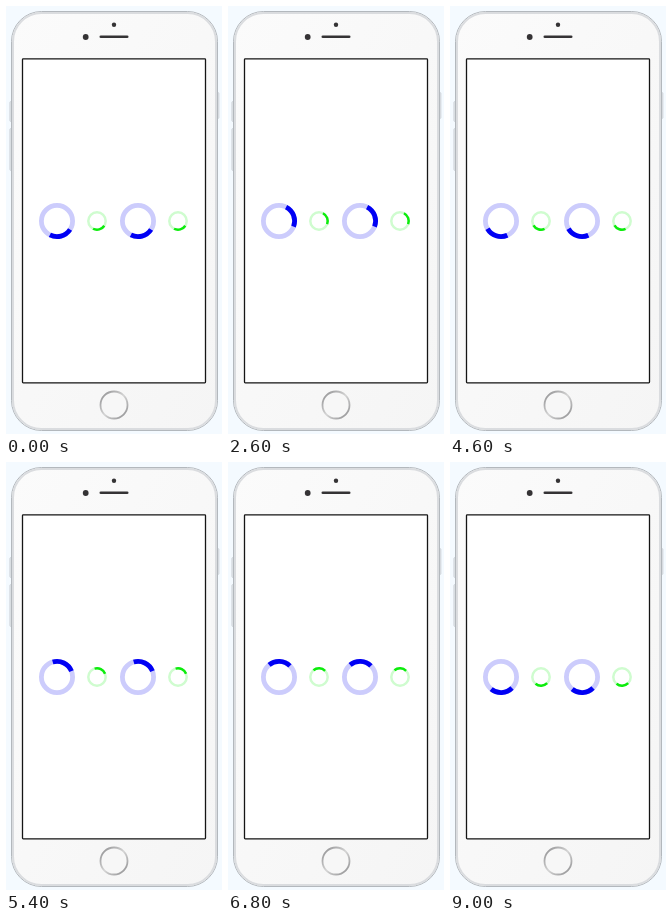
Recreate the animation shown at these times as an HTML page. Size 216 by 428 pixels, loop 9.2 s.

```html
<!DOCTYPE html>
<html lang="en">
<meta charset="utf-8">
<title>Spinners</title>
<style>
  html, body { margin: 0; height: 100%; overflow: hidden; background: #f4faff; }
  svg { display: block; width: 216px; height: 428px; }
</style>
<svg viewBox="0 0 216 428" fill="none">
  <defs>
    <linearGradient id="metal" x2="1" y2="1">
      <stop stop-color="#8c8c8e"/>
      <stop offset=".5" stop-color="#d4d4d4"/>
      <stop offset="1" stop-color="#8c8c8e"/>
    </linearGradient>
    <linearGradient id="body" x2="1" y2="1">
      <stop stop-color="#fbfbfb"/>
      <stop offset="1" stop-color="#f5f5f5"/>
    </linearGradient>
  </defs>

  <!-- phone -->
  <g fill="#dfe3e7" stroke="#bcc3c9" stroke-width=".5">
    <rect x="3.8" y="95.5" width="2.5" height="20" rx="1"/>
    <rect x="3.8" y="122.5" width="2.5" height="42" rx="1"/>
    <rect x="210.5" y="86.5" width="2.5" height="26" rx="1"/>
  </g>
  <rect x="5.5" y="5.5" width="206" height="419" rx="30" fill="url(#body)" stroke="#b3b8bd"/>
  <rect x="7" y="7" width="203" height="416" rx="28.5" stroke="#dadcdf" stroke-width="2"/>
  <g fill="#353335">
    <circle cx="108" cy="18.8" r="2.2"/>
    <circle cx="79.7" cy="31" r="2.9"/>
    <rect x="93.5" y="29.5" width="29" height="2.6" rx="1.3"/>
  </g>
  <rect x="16.5" y="52.8" width="183" height="324" rx=".7" fill="#fff" stroke="#151515" stroke-width="1.3"/>
  <circle cx="108" cy="399" r="13.5" fill="#f7f7f7" stroke="url(#metal)" stroke-width="1.8"/>

  <g id="spinners"></g>
</svg>
<script>
  const STEP = 200, LOOP = 9200;
  const ARC = 84; // degrees
  // [step, angle of the arc's middle in degrees]
  const turns = [[0, 75], [6, 374], [13, 699], [23, 1188], [30, 1517], [38, 1908], [45, 2247]];

  const spinner = (x, r, width, color, track) => `
    <g transform="translate(${x} 215)" stroke-width="${width}">
      <circle r="${r}" stroke="${track}"/>
      <circle class="arc" r="${r}" stroke="${color}" pathLength="360"
        stroke-dasharray="${ARC} ${360 - ARC}" stroke-dashoffset="${ARC / 2}"/>
    </g>`;
  const pair = x =>
    spinner(x, 15.6, 4.8, '#0000f4', '#ccccfc') +
    spinner(x + 40, 8.7, 2.5, '#0cec0c', '#cffccf');

  const group = document.getElementById('spinners');
  group.innerHTML = pair(51) + pair(132);
  const arcs = group.querySelectorAll('.arc');

  function angleAt(step) {
    const i = Math.max(1, turns.findIndex(([s]) => s >= step));
    const [s0, a0] = turns[i - 1], [s1, a1] = turns[i];
    return a0 + (a1 - a0) * (step - s0) / (s1 - s0);
  }

  function draw() {
    const step = Math.floor(performance.now() % LOOP / STEP);
    const turn = `rotate(${angleAt(step)})`;
    for (const arc of arcs) arc.setAttribute('transform', turn);
    requestAnimationFrame(draw);
  }
  draw();
</script>
</html>
```
